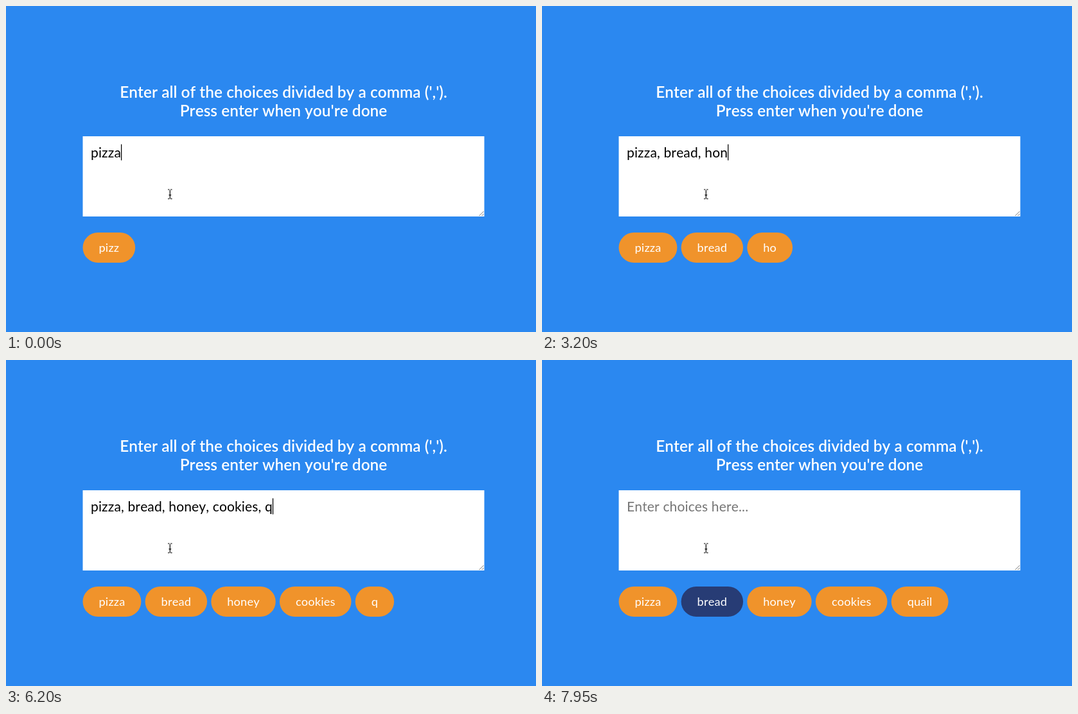
An HTML page with a canvas that plays this animation: 825 px wide and 508 px high, repeating every 8 s.

```html
<!DOCTYPE html>
<html lang="en">
<head>
<meta charset="utf-8">
<title>Random choice picker</title>
<style>
  html, body { margin: 0; width: 825px; height: 508px; overflow: hidden; background: #2b88f0; }
  canvas { display: block; }
</style>
</head>
<body>
<canvas width="825" height="508"></canvas>
<script>
const ctx = document.querySelector('canvas').getContext('2d');
const LOOP = 8000;
const CLEARED = 7340;
const ECHO = 80;        // a tag follows its keystroke by this long
const BLINK = 530;
const PICK_START = 7430;
const PICK_STEP = 172;
const PICKS = ['honey', 'cookies', 'quail', 'bread'];

const HEADING = { font: '600 24.4px Lato, sans-serif', spacing: '0.05px' };
const INPUT = { font: '21px Lato, sans-serif', spacing: '0.15px' };
const TAG = { font: '18.2px Lato, sans-serif', spacing: '0.17px' };

// Times of the first letter, the last letter and the comma
const words = [
  { text: 'pizza', start: -700, end: 0, comma: 360 },
  { text: 'bread', start: 990, end: 1690, comma: 1870 },
  { text: 'honey', start: 2940, end: 3540, comma: 4080 },
  { text: 'cookies', start: 4530, end: 5590, comma: 5760 },
  { text: 'quail', start: 6120, end: 6900 },
];

// Letters come fast at first and then slow down
words.forEach((word, i) => {
  const { text, start, end, comma } = word;
  const last = text.length - 1;
  word.times = [...text].map((_, k) => start + (end - start) * (k / last) ** 1.6);
  const next = words[i + 1];
  word.gap = next ? [comma, comma + 0.35 * (next.start - comma)] : [];
});

const countUntil = (times, t) => times.filter(time => time <= t).length;

function setType({ font, spacing }) {
  ctx.font = font;
  ctx.letterSpacing = spacing;
  ctx.fontKerning = 'none';
}

function measure(text, type) {
  setType(type);
  return ctx.measureText(text).width;
}

function label(text, x, y, type, color, align = 'left') {
  setType(type);
  ctx.fillStyle = color;
  ctx.textAlign = align;
  ctx.fillText(text, x, y);
}

function box(x, y, w, h, color) {
  ctx.fillStyle = color;
  ctx.fillRect(x, y, w, h);
}

function line(color, width, ...segments) {
  ctx.strokeStyle = color;
  ctx.lineWidth = width;
  ctx.beginPath();
  for (const [x1, y1, x2, y2] of segments) {
    ctx.moveTo(x1, y1);
    ctx.lineTo(x2, y2);
  }
  ctx.stroke();
}

function drawTags(t) {
  const pick = PICKS[Math.floor((t - PICK_START) / PICK_STEP)];
  let x = 119.5;
  for (const { text, times } of words) {
    const part = text.slice(0, countUntil(times, t - ECHO));
    if (!part) break;
    const w = 50 + measure(part, TAG);
    ctx.fillStyle = text === pick ? '#273c75' : '#f0932b';
    ctx.beginPath();
    ctx.roundRect(x, 353, w, 47, 23.5);
    ctx.fill();
    label(part, x + 25, 383, TAG, '#fff');
    x += w + 6.2;
  }
}

function drawInput(t) {
  box(119.5, 203, 625, 125, '#fff');
  line('#777', 1, [736.5, 327, 743.5, 320], [740.5, 327, 743.5, 324]);

  const cleared = t >= CLEARED;
  let typed = '';
  let lastKey = CLEARED;
  if (cleared) {
    label('Enter choices here...', 132, 236, INPUT, '#757575');
  } else {
    const keys = words.flatMap(word => [...word.times, ...word.gap]);
    const count = countUntil(keys, t);
    typed = words.map(word => word.text).join(', ').slice(0, count);
    lastKey = keys[count - 1];
    label(typed, 132, 236, INPUT, '#000');
  }
  if (t - lastKey < BLINK) box(132 + measure(typed, INPUT), 215.5, 1.25, 25, '#000');
}

function drawPointer() {
  const x = 255.3;
  const serifs = [286, 300.5].flatMap(y => [[x - 3.3, y, x - 0.7, y], [x + 0.7, y, x + 3.3, y]]);
  line('#000', 1.2, [x, 287, x, 300], [x - 1.8, 294.7, x + 1.9, 294.7], ...serifs);
}

function draw(t) {
  box(0, 0, 825, 508, '#2b88f0');
  label("Enter all of the choices divided by a comma (',').", 432, 142.5, HEADING, '#fff', 'center');
  label("Press enter when you're done", 432, 171.8, HEADING, '#fff', 'center');
  drawInput(t);
  drawTags(t);
  drawPointer();
}

const start = performance.now();
function tick() {
  draw((performance.now() - start) % LOOP);
  requestAnimationFrame(tick);
}
tick();
</script>
</body>
</html>
```
